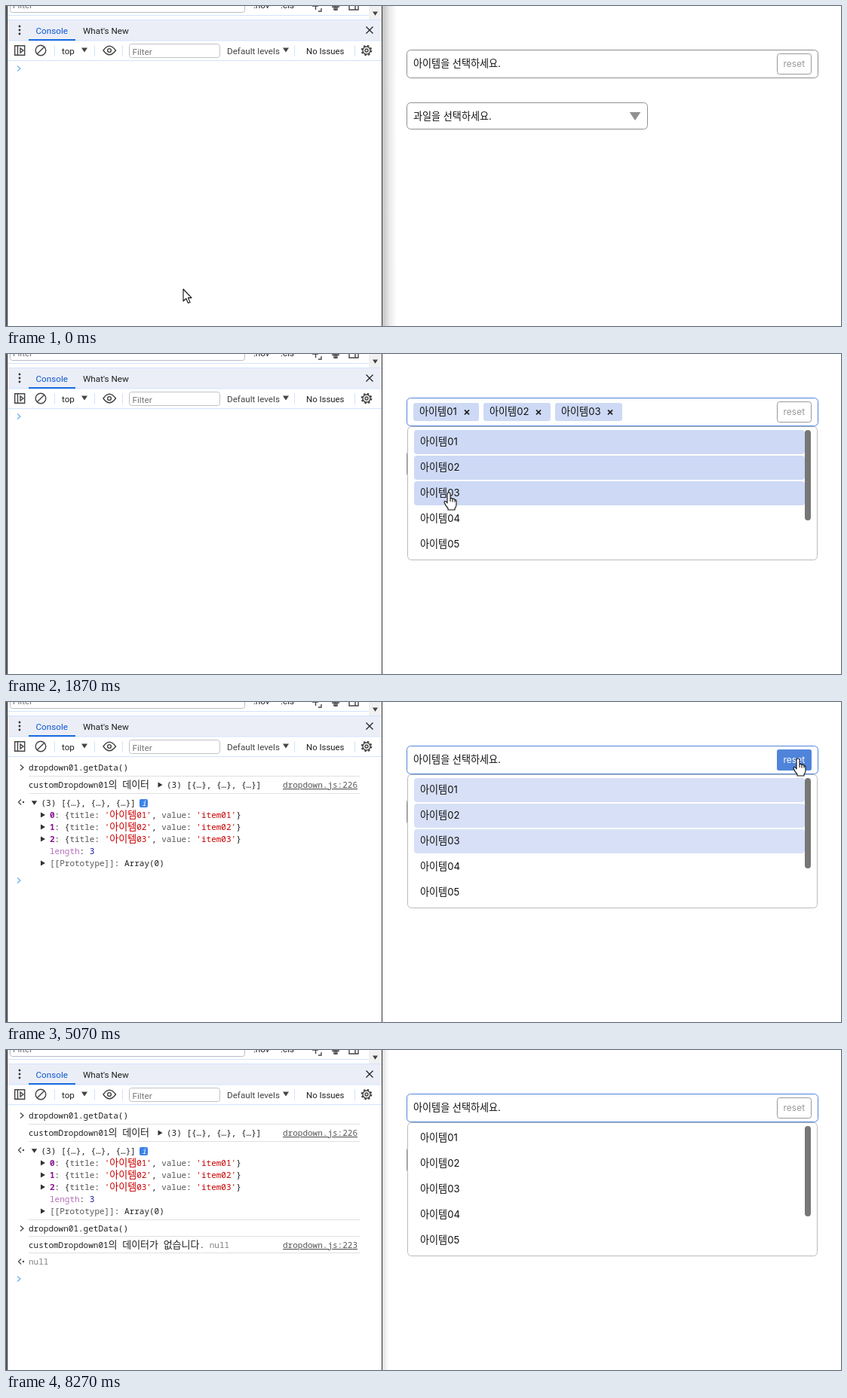
Animation of 1107 by 425 pixels, one loop 8.47 s. Source, as an HTML page:

```html
<!DOCTYPE html>
<html lang="ko">
<head>
<meta charset="utf-8">
<style>
html, body { margin: 0; width: 100%; height: 100%; overflow: hidden; background: #fff; }
svg { display: block; width: 1107px; height: 425px; }
text { white-space: pre; }
.ui { font: 11.7px Roboto, 'Open Sans', sans-serif; fill: #1f1f1f; }
.mono { font: 11px 'Noto Sans Mono', 'DejaVu Sans Mono', 'Noto Sans CJK KR', monospace; fill: #1f1f1f; }
.ko { font: 13px 'Noto Sans CJK KR', 'Noto Sans CJK JP', sans-serif; }
.app { font: 13.1px Inter, 'Noto Sans CJK KR', 'Noto Sans CJK JP', sans-serif; fill: #111; }
.grey { fill: #757575; }
.icon { fill: none; stroke: #444; stroke-width: 1.4; }
</style>
</head>
<body>
<svg id="stage" viewBox="0 0 1107 425"></svg>
<script>
const LOOP = 8470, END = 9999;
const OPEN = 800, PICKS = [1130, 1500, 1730], FOCUS = 2330, RUN = 2870,
  EXPAND = 3900, RESET = 5030, REFOCUS = 5700, RECALL = 6600, RERUN = 6880, BLUR = 8270;

const text = (x, y, s, cls = 'mono', extra = '') => `<text x="${x}" y="${y}" class="${cls}" ${extra}>${s}</text>`;
const rect = (x, y, w, h, fill, extra = '') => `<rect x="${x}" y="${y}" width="${w}" height="${h}" fill="${fill}" ${extra}/>`;
const frame = (x, y, w, h, stroke, r = 5) =>
  rect(x + .5, y + .5, w - 1, h - 1, '#fff', `rx="${r}" stroke="${stroke}"`);
const path = (d, extra = 'class="icon"') => `<path d="${d}" ${extra}/>`;
const span = (fill, s) => `<tspan fill="${fill}">${s}</tspan>`;
const ko = s => `<tspan class="ko">${s}</tspan>`;
// Visible from a to b, with optional fades that start at each end.
const part = (a, b, s, fadeIn = 0, fadeOut = 0) => `<g data-span="${[a, b, fadeIn, fadeOut]}">${s}</g>`;
const right = (x, y) => path(`M${x - 2.5} ${y - 3.5}l6 3.5l-6 3.5z`, 'fill="#333"');
const down = (x, y, r = 4, fill = '#444') => path(`M${x - r} ${y - r * .75}h${2 * r}l${-r} ${r * 1.5}z`, `fill="${fill}"`);
const cross = (x, y, r, w) => path(`M${x - r} ${y - r}l${2 * r} ${2 * r}m0 ${-2 * r}l${-2 * r} ${2 * r}`,
  `fill="none" stroke="#222" stroke-width="${w}"`);
const rule = y => rect(30, y, 439, 1, '#e0e0e0');
const chevron = (x, y, color) => path(`M${x - 2} ${y - 3.5}l4 3.5l-4 3.5`, `fill="none" stroke="${color}" stroke-width="1.3"`);
const returned = y => path(`M20 ${y - 3.5}l-3.5 3.5l3.5 3.5`, 'fill="none" stroke="#444" stroke-width="1.2"') +
  `<circle cx="23" cy="${y}" r="1.2" fill="#444"/>`;
const link = (y, line) => text(367, y, 'dropdown.js:' + line, 'mono', 'style="fill:#555" text-decoration="underline"');

function toolbars() {
  const sep = x => rect(x, 52, 1, 15, '#d3e3fd');
  return rect(0, 0, 1, 425, '#777') + rect(1, 0, 1, 425, '#1a1a22') +
    frame(5, -12, 312, 21, '#b9bdc5', 3) + text(9, 3, 'Filter', 'ui grey') +
    text(328, 3, ':hov', 'ui', 'font-weight="500"') + text(364, 3, '.cls', 'ui', 'font-weight="500"') +
    path('M406 0h8M410.500 -4v9M418 3v4h-4M432 1h10M437 -3v9M435 1v4h4v-4M455 -3v8h12v-8M463 -3v8') +
    rect(2, 12, 479, 1, '#d3e3fd') + rect(481, 0, 17, 18, '#f1f1f1') + down(489.5, 10, 3.5) +
    rect(2, 18, 496, 28, '#ebeef7') + rect(2, 18, 496, 1, '#d3e3fd') +
    [27, 32, 37].map(y => `<circle cx="18" cy="${y}" r="1.4" fill="#333"/>`).join('') +
    text(39.5, 37, 'Console', 'ui', 'style="fill:#0b57d0"') + text(102, 37, "What's New", 'ui') +
    rect(2, 45.5, 496, 1, '#d3e3fd') + rect(30, 44, 62, 2, '#1a6be0') + cross(482, 32, 4.5, 1.3) +
    path('M11.700 52.700h13v12.600h-13zM15.500 52.700v12.600M19 56l4 3l-4 3z') +
    '<circle cx="46" cy="59" r="6.800" class="icon"/>' + path('M41.200 63.800l9.600 -9.600') +
    [64, 117, 154, 382, 462].map(sep).join('') +
    text(74, 64, 'top', 'ui') + down(104, 58.5) +
    path('M129 59Q137 47.500 145.500 59Q137 70.500 129 59z') + '<circle cx="137" cy="59" r="2.400" class="icon"/>' +
    frame(163, 50, 121, 19, '#bfc3ca', 3) + text(167.5, 65, 'Filter', 'ui grey') +
    text(293, 64, 'Default levels', 'ui', 'style="fill:#444"') + down(371, 58.5) +
    text(398, 64, 'No Issues', 'ui', 'style="font-size:11.4px"') +
    '<g class="icon"><circle cx="478" cy="59" r="5"/><circle cx="478" cy="59" r="2"/>' +
    '<circle cx="478" cy="59" r="6.300" stroke-width="2" stroke-dasharray="2.500 2.450"/></g>' +
    rect(2, 72, 496, 1, '#d3e3fd');
}

const command = 'dropdown01.getData()';
const summary = '(3) [{…}, {…}, {…}]';

function typed(y) {
  return rect(147, y - 7, 13, 14, '#e4e4e4') + text(28, y + 4, command) +
    rect(147, y + 7, 13, 1, '#777') + rect(159, y - 7, 1, 14, '#111');
}

function consoleBody() {
  const italic = 'font-style="italic"';
  const entry = i => {
    const y = 150 + i * 16, red = '#c80000';
    return right(48.5, y) + text(58, y + 4, span('#881391', `<tspan font-weight="600">${i}</tspan>`) + ': {' +
      span('#555', 'title') + ': ' + span(red, `'${ko('아이템')}0${i + 1}'`) + ', ' + span('#555', 'value') + ': ' +
      span(red, `'item0${i + 1}'`) + '}');
  };
  const prompts = [[0, RUN, 83], [RUN, EXPAND, 157], [EXPAND, RERUN, 237], [RERUN, END, 304]];
  const hover = part(3600, 4000, rect(2, 126, 310, 16, '#f0f0f0'));
  const first = hover + chevron(21, 87, '#444') + text(30, 91, command) + rule(98) +
    text(30, 114, `customDropdown01${ko('의')} ${ko('데이터')}`) + right(204, 110) +
    text(213, 114, summary, 'mono', italic) + link(114, 226) + rule(121) +
    returned(133) + text(46.5, 138, summary, 'mono', italic);
  const expanded = down(37.5, 134, 3.7, '#333') + rect(177, 129, 11, 11, '#3b82e8', 'rx="2"') +
    text(180, 138, 'i', 'mono', 'style="fill:#fff;font-size:10px;font-style:italic"') + [0, 1, 2].map(entry).join('') +
    text(58, 202, span('#b56fba', 'length') + ': ' + span('#1a1aa6', '3')) +
    right(48.5, 214) + text(58, 218, span('#555', '[[Prototype]]') + ': Array(0)');
  const second = rule(225) + chevron(21, 237, '#444') + text(30, 241, command) + rule(247) +
    text(30, 263, `customDropdown01${ko('의')} ${ko('데이터가')} ${ko('없습니다')}. ` + span('#808080', 'null')) +
    link(263, 223) + rule(269) + returned(281) + text(30, 285, 'null', 'mono', 'style="fill:#808080"');
  const carets = [7000, 8000].map(t => part(t, Math.min(t + 500, 8130), rect(27, 297, 1, 14, '#111')));
  return part(RUN, END, first) + part(RUN, EXPAND, right(36, 134)) + part(EXPAND, END, expanded) +
    part(RERUN, END, second) + part(2530, RUN, typed(84)) + part(RECALL, RERUN, typed(238)) +
    prompts.map(([a, b, y]) => part(a, b, chevron(17, y, '#70b0f2'))).join('') +
    part(FOCUS, RUN, chevron(17, 83, '#2f77e6')) + part(RECALL, RERUN, chevron(17, 237, '#2f77e6')) + carets.join('');
}

function widgets() {
  const blue = '#cdd9f5', accent = '#4f84da', xs = [540, 633, 728], ws = [87, 89, 89];
  const hint = text(540, 81, '아이템을 선택하세요.', 'app');
  const tag = i => part(PICKS[i], RESET, rect(xs[i], 65, ws[i], 24, blue, 'rx="3"') +
    text(xs[i] + 8, 81, '아이템0' + (i + 1), 'app') + cross(xs[i] + ws[i] - 16, 77.3, 3, 1.7));
  const rowFill = (i, fill) => rect(541, 101 + 34 * i, 518, 32, fill, 'rx="4"');
  const hovers = [[0, 1000, 1250], [1, 1250, 1600], [2, 1600, 1900]];
  const menu = frame(532, 96, 544, 178, '#bbb') +
    hovers.map(([i, a, b]) => part(a, b, rowFill(i, '#f4f4f4'))).join('') +
    PICKS.map((t, i) => part(t, RESET, rowFill(i, blue), 60, 200)).join('') +
    [0, 1, 2, 3, 4].map(i => text(549, 121 + 34 * i, '아이템0' + (i + 1), 'app')).join('') +
    rect(1059, 101, 8, 120, '#777', 'rx="4"');
  const label = fill => text(1030.5, 81, 'reset', 'app', `style="font-size:12px;fill:${fill}"`);
  return frame(531, 128, 320, 36, '#909090') + text(540, 151, '과일을 선택하세요.', 'app') + down(834, 146.5, 7.3, '#909090') +
    part(0, OPEN, frame(531, 58, 546, 38, '#909090')) + part(OPEN, END, frame(531, 58, 546, 38, accent)) +
    part(0, PICKS[0], hint) + part(RESET, END, hint) + [0, 1, 2].map(tag).join('') +
    frame(1022, 63, 46, 28, '#999', 3) + label('#999') +
    part(4780, 5290, rect(1022, 63, 46, 28, accent, 'rx="3"') + label('#fff'), 100, 120) +
    part(OPEN, END, menu, 150);
}

function shadows() {
  const wide = rect(499, 0, 19, 425, 'url(#wide)'), slim = rect(499, 0, 9, 425, 'url(#slim)');
  const grad = (id, o) => `<linearGradient id="${id}"><stop stop-opacity="${o}"/>` +
    `<stop offset=".5" stop-opacity="${o * .35}"/><stop offset="1" stop-opacity="0"/></linearGradient>`;
  return grad('wide', .24) + grad('slim', .14) + part(0, OPEN, wide) + part(FOCUS, RESET, wide) +
    part(REFOCUS, BLUR, wide) + part(BLUR, END, slim) + rect(498, 0, 1, 425, '#333');
}

// Pointer route: time, x, y.
const route = [
  [0, 235, 376], [70, 235, 376], [700, 620, 72], [870, 620, 72], [1100, 600, 112], [1170, 600, 113],
  [1340, 603, 145], [1530, 603, 145], [1680, 606, 180], [1800, 606, 180], [2270, 292, 246], [3000, 292, 246],
  [3470, 70, 138], [3800, 37, 131], [3950, 37, 131], [4330, 418, 158], [4400, 440, 156], [4850, 1050, 75],
  [5200, 1050, 75], [5600, 160, 252], [5800, 137, 250], [6070, 127, 249], [6330, 65, 249],
  [7270, 160, 283], [8130, 52, 424]
];
const hidden = t => t >= 6530 && t < 7270 || t >= 8200;

function pointerAt(t) {
  const i = route.findIndex(k => k[0] > t);
  if (i < 0) return route[route.length - 1].slice(1);
  const [t0, x0, y0] = route[i - 1], [t1, x1, y1] = route[i];
  const u = (t - t0) / (t1 - t0), e = u * u * (3 - 2 * u);
  return [x0 + (x1 - x0) * e, y0 + (y1 - y0) * e];
}

const outline = 'fill="#fff" stroke="#111" stroke-width="1.1" stroke-linejoin="round"';
stage.innerHTML = rect(0, 0, 1107, 425, '#fff') + toolbars() + consoleBody() + shadows() + widgets() +
  `<g id="pointer">${path('M0 0V16L3.800 12.500L6.500 18.500L9 17.400L6.400 11.600H11Z', outline + ' id="arrow"')}` +
  path('M-2 2Q-2 0 0 0T2 2V8Q4 6.500 5 8.500Q7 7.500 8 9.500Q10 9 10 12V16Q10 19 8 21V23H-1V21Q-4 18 -6 13' +
    'Q-6 10.500 -3.500 12L-2 14ZM2 8v4M5 8.500v4M8 9.500v3', outline + ' id="hand"') + '</g>';

const parts = [...stage.querySelectorAll('[data-span]')].map(el => [el, ...el.dataset.span.split(',').map(Number)]);
const clamp = v => Math.max(0, Math.min(1, v));
const show = (el, on) => el.setAttribute('display', on ? 'inline' : 'none');

function draw(now) {
  const t = now % LOOP;
  for (const [el, a, b, fadeIn, fadeOut] of parts) {
    show(el, t >= a && t < b + fadeOut);
    const rise = fadeIn ? clamp((t - a) / fadeIn) : 1;
    const fall = fadeOut ? clamp((b + fadeOut - t) / fadeOut) : 1;
    el.setAttribute('opacity', rise * fall);
  }
  const [x, y] = pointerAt(t).map(Math.round);
  const onWidget = x > 531 && y > 58 && y < 96 || x > 541 && y > 96 && y < 273 && t > OPEN;
  show(pointer, !hidden(t));
  show(hand, onWidget);
  show(arrow, !onWidget);
  pointer.setAttribute('transform', `translate(${x} ${y})`);
  requestAnimationFrame(draw);
}
const start = performance.now();
requestAnimationFrame(() => draw(0));
const raf = requestAnimationFrame.bind(window);
window.requestAnimationFrame = fn => raf(() => fn(performance.now() - start));
</script>
</body>
</html>
```
